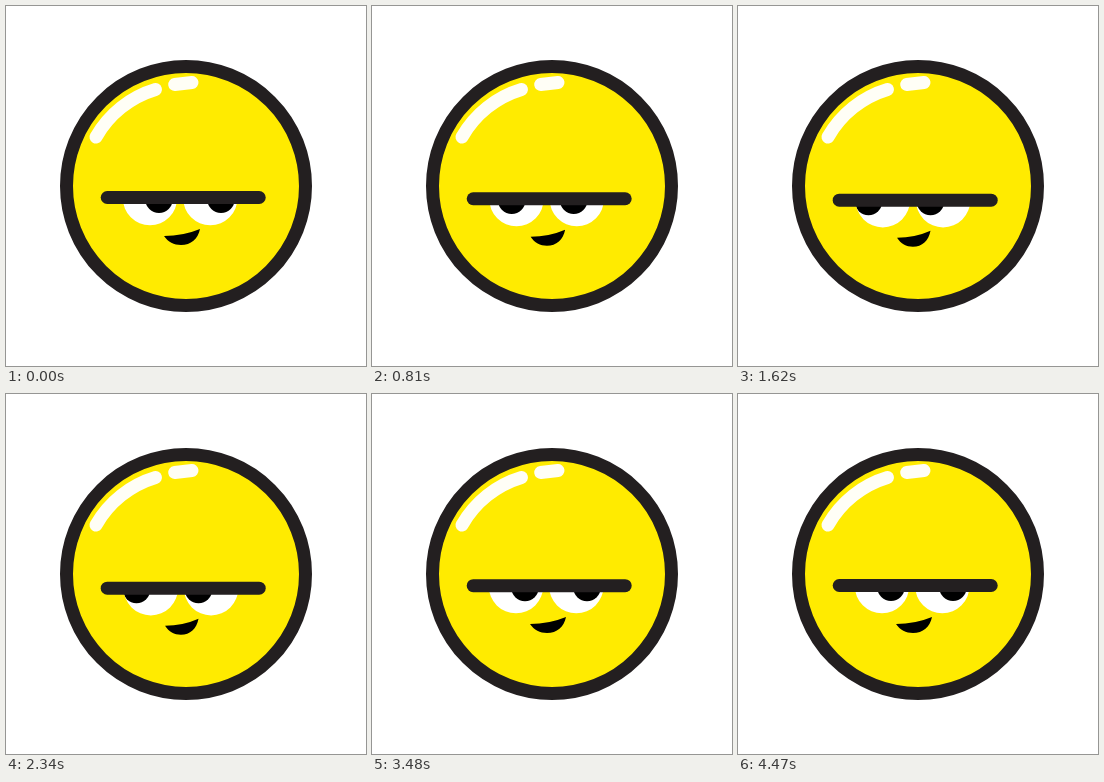
Recreate the animation shown at these times as an HTML page. Size 360 by 360 pixels, loop 4500 ms.

```html
<!DOCTYPE html>
<html lang="en">
<head>
<meta charset="utf-8">
<title>Bored smiley</title>
<style>
  html, body { margin: 0; height: 100%; overflow: hidden; background: #fff; }
  svg { display: block; width: 100%; height: 100%; }
</style>
</head>
<body>
<svg viewBox="0 0 360 360">
  <defs>
    <clipPath id="eyes"><circle cx="144" cy="192" r="27.2"/><circle cx="204.3" cy="192" r="27.2"/></clipPath>
    <clipPath id="lid"><rect x="60" y="192" width="240" height="60"/></clipPath>
  </defs>
  <circle cx="180" cy="180" r="119.5" fill="#ffeb00" stroke="#231f20" stroke-width="13"/>
  <g fill="none" stroke="#fffef6" stroke-width="13" stroke-linecap="round">
    <path d="M90 131A102.3 102.3 0 0 1 149.5 83.5"/>
    <path d="M168.7 78.5L186 76.5"/>
  </g>
  <g id="lids" clip-path="url(#lid)">
    <g id="gaze" clip-path="url(#eyes)">
      <path fill="#fff" d="M100 150h150v80h-150z"/>
      <g id="pupils"><circle cx="153" cy="193.3" r="13.7"/><circle cx="215" cy="193.3" r="13.7"/></g>
    </g>
  </g>
  <path id="brow" d="M101.2 191.5H253.2" stroke="#231f20" stroke-width="13" stroke-linecap="round"/>
  <path id="mouth" d="M158 230Q177 230 194 223C192 233 185 239 175 239C168 239 162 236 158 230Z"/>
</svg>
<script>
  const LOOP = 4500;
  const part = id => document.getElementById(id);
  const move = (id, transform) => part(id).setAttribute('transform', transform);

  const ease = (t, from, to) => {
    const s = Math.min(1, Math.max(0, (t - from) / (to - from)));
    return s * s * (3 - 2 * s);
  };

  function draw(now) {
    const t = now % LOOP;
    const look = ease(t, 430, 1110) - ease(t, 2830, 3480);
    const drop = ease(t, 200, 1500) - ease(t, 2300, 3700);

    move('lids', `translate(0 ${2.7 * drop})`);
    move('brow', `translate(0 ${2.7 * drop})`);
    move('gaze', `translate(${0.8 * look} ${-0.5 * drop})`);
    move('pupils', `translate(${-23.3 * look} 0)`);
    move('mouth', `translate(${175.7 - 0.2 * look} ${231 + 1.8 * drop}) scale(${1 - 0.07 * look} 1) translate(-175.7 -231)`);
    requestAnimationFrame(draw);
  }
  requestAnimationFrame(draw);
</script>
</body>
</html>
```
